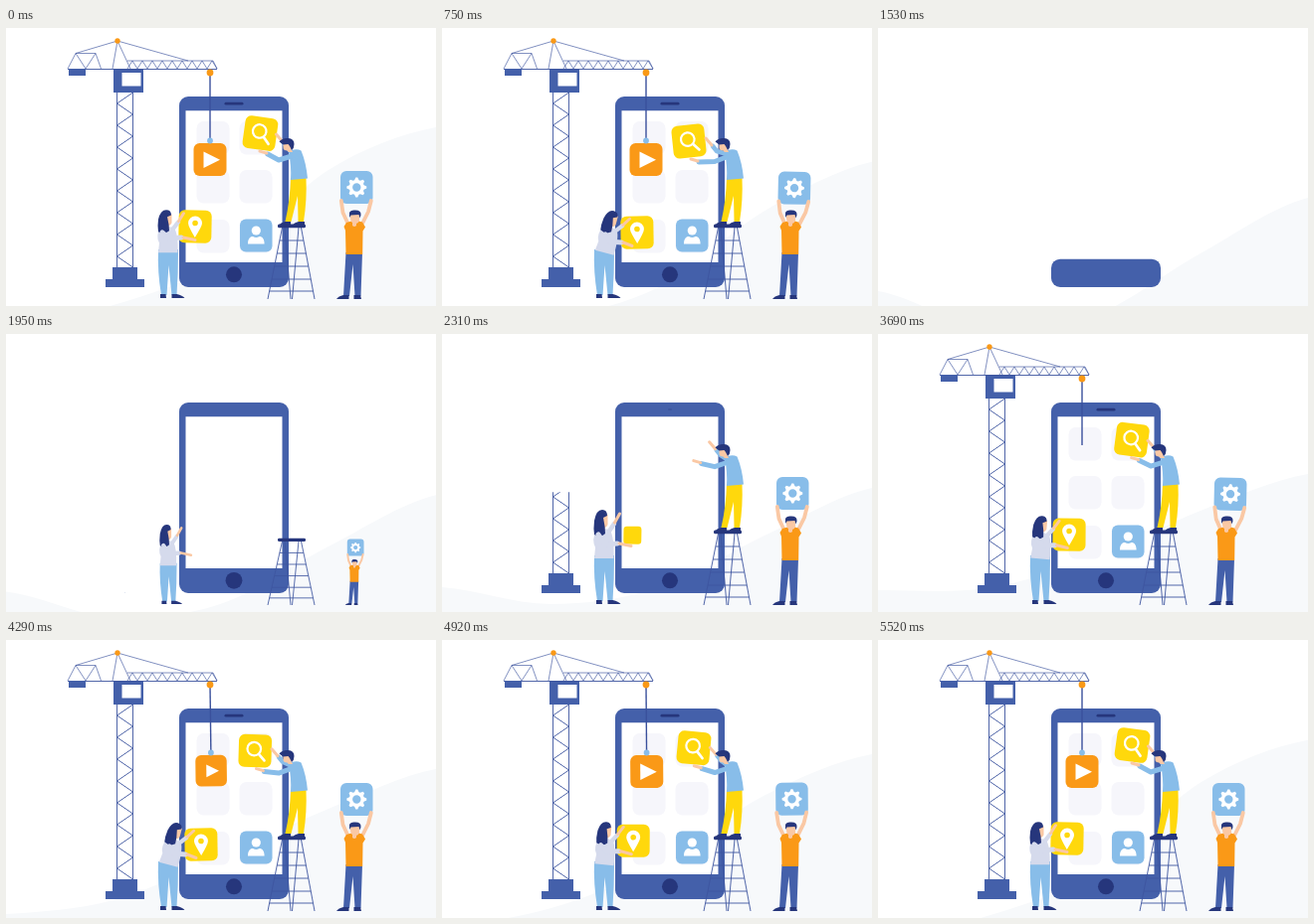
Recreate the animation shown at these times as an HTML page. Size 432x280 px, loop 5550 ms.

```html
<!DOCTYPE html>
<html lang="en">
<head>
<meta charset="utf-8">
<title>Building an app</title>
<style>
html, body { margin: 0; width: 100%; height: 100%; overflow: hidden; background: #fff; }
svg { display: block; width: 100vw; height: 100vh; }
.blue { fill: #4460aa; } .navy { fill: #26367c; } .sky { fill: #88bde9; }
.yellow { fill: #ffd80c; } .orange { fill: #fa9917; } .white { fill: #fff; }
.skin { fill: #fac8a4; } .pale { fill: #d5daec; } .slot { fill: #f6f6fb; }
.line { fill: none; stroke: #3e55a0; stroke-width: .9; stroke-linejoin: round; }
.thin { stroke-width: .65; }
.limb { fill: none; stroke-linecap: round; stroke-linejoin: round; }
</style>
</head>
<body>
<svg viewBox="0 0 432 280">
  <defs>
    <clipPath id="mastClip"><rect id="mastBox" x="105" width="30"/></clipPath>
    <clipPath id="jibClip"><rect id="jibBox" x="120" y="28" height="16"/></clipPath>
    <clipPath id="phoneClip"><rect id="phoneBox" x="174" width="110" rx="9"/></clipPath>
  </defs>
  <path id="wave" fill="#f7f9fb"/>
  <g id="stage">
    <g id="crane">
      <g id="base" class="blue"><path d="M100 253h39v8h-39zM107 241h25v12h-25z"/></g>
      <path id="mast" class="line" clip-path="url(#mastClip)"/>
      <g id="cab"><path class="blue" d="M108 41h30v24h-30z"/><path class="white" d="M116.500 45h19v13.500h-19z"/></g>
      <path id="jib" class="line thin" clip-path="url(#jibClip)"/>
      <path id="beam" class="line"/>
      <g class="line thin">
        <path class="draw" data-span="2640 3060" d="M95.500 41L90 25.500L80 41L70 25.500L62 41"/>
        <path class="draw" data-span="2760 3120" d="M90 25.500H70"/>
        <path class="draw" data-span="2880 3180" d="M107 41L112 13L125 41"/>
        <path class="draw" data-span="3000 3300" d="M112 13L70 25.500"/>
        <path class="draw" data-span="3000 3360" d="M112 13L183 33"/>
      </g>
      <path id="weight" class="blue" d="M63 41h17v7h-17z"/>
      <circle id="apex" class="orange" cx="112" cy="13" r="2.700"/>
    </g>

    <g clip-path="url(#phoneClip)">
      <path class="blue" d="M174 69h110v192h-110z"/>
      <path class="white" id="screen"/>
      <g id="slots" class="slot"></g>
      <circle id="home" class="navy" cx="229" cy="248.300" r="8"/>
      <rect id="speaker" class="navy" x="219.500" y="74.800" width="19" height="2.800" rx="1.400"/>
    </g>

    <g id="avatar">
      <rect class="sky" x="235" y="192.500" width="32.500" height="33" rx="6"/>
      <circle class="white" cx="251.300" cy="204" r="4.600"/>
      <path class="white" d="M243 217.500c0-5 2-7.500 5-7.500q3.300 2 6.600 0c3 0 5 2.500 5 7.500z"/>
    </g>

    <g id="hoist">
      <path id="rope" stroke="#3a509c" stroke-width="1.400"/>
      <g id="play">
        <rect class="orange" x="188.500" y="116" width="33" height="33" rx="6"/>
        <path id="arrow" class="white" d="M198.500 124.500v16.500l16.500-8.200z"/>
      </g>
      <circle id="hook" class="sky" cx="205" cy="113.500" r="2.900"/>
      <circle id="trolley" class="orange" cx="205" cy="45" r="3.400"/>
    </g>

    <g id="search">
      <rect class="yellow" x="-16.500" y="-16.500" width="33" height="33" rx="6"/>
      <g fill="none" stroke="#fff"><circle cx="-1" cy="-2" r="6.800" stroke-width="2.200"/><path d="M4 3.500L9.500 9.500" stroke-width="2.700" stroke-linecap="round"/></g>
    </g>

    <g id="ladder">
      <path class="line" id="rungs"/>
      <rect class="navy" x="273" y="197.500" width="28" height="3.800" rx="1.500"/>
    </g>
    <g id="climber">
      <path class="yellow" d="M286 151h15.500q1 22-2.500 44h-5.500l-.500-26-6.500 26h-6q5-22 5.500-44z"/>
      <path class="navy" d="M274.500 199q1-3 6-4h5.500v4zM288 199q1-3 6-4h6v4z"/>
      <path id="farArm" class="limb" stroke="#88bde9" stroke-width="4.500"/>
      <path id="farHand" class="limb" stroke="#fac8a4" stroke-width="3"/>
      <path class="sky" d="M284 124.500q7-4 12.500-1 5 12 6.500 28l-17 1.500q1-13-2-28.500z"/>
      <path id="nearArm" class="limb" stroke="#88bde9" stroke-width="5"/>
      <path id="nearHand" class="limb" stroke="#fac8a4" stroke-width="3"/>
      <path class="skin" d="M278.500 116h8v6l1.500 3h-4l-1.500-1.500q-4 0-4-3z"/>
      <path class="navy" d="M274.500 114.500q3-4 9-3.500 6 .500 6 6 0 4-2.500 6l-2-4-1.500-2-5 .500z"/>
    </g>

    <g id="woman">
      <path class="sky" d="M153 223h20q0 24-1.500 46h-5l-3-30-2 30h-5.500q-4-24-3-46z"/>
      <path class="navy" d="M155 272v-4h5.500l.500 4zM166.500 272v-4h5q6 1.500 8 4z"/>
      <g id="pin">
        <rect class="yellow" x="-16.500" y="-16.500" width="33" height="33" rx="6"/>
        <g id="marker"><path class="white" d="M0 11Q-7-.500-7-3.500a7 7 0 0 1 14 0Q7-.500 0 11z"/><circle class="yellow" cy="-3.500" r="2.800"/></g>
      </g>
      <g id="torso">
        <path class="limb" stroke="#d5daec" stroke-width="4.500" d="M167 200L173 191"/>
        <path class="limb" stroke="#fac8a4" stroke-width="3" d="M173.500 190L178.500 181"/>
        <path class="pale" d="M155 198q8-4 14 0 4 6 3.500 28h-19.500l1-11q-4-8 1-17z"/>
        <path class="skin" d="M160 182h6.500v10q-1 3-3 3v4h-5z"/>
        <path class="navy" d="M153 202q-1-6 0-14 2-11 8-11 5 0 5 6l-4 2q2 9 2 16-5 5-11 1z"/>
      </g>
      <path id="lowArm" class="limb" stroke="#d5daec" stroke-width="5"/>
      <path id="lowHand" class="limb" stroke="#fac8a4" stroke-width="3"/>
    </g>

    <g id="holder">
      <path class="blue" d="M341.500 226h16.500l-1.500 44h-6l-2-32-3.500 32h-6z"/>
      <path class="navy" d="M332 273q2-3 7-4h5.500v4zM349.500 273v-4h6.500l1 4z"/>
      <g id="lift">
        <g id="gear">
          <rect class="sky" x="336" y="144" width="32.500" height="33" rx="6"/>
          <path id="cog" class="white" fill-rule="evenodd"/>
        </g>
        <path class="limb" stroke="#fac8a4" stroke-width="3.800" d="M344 198L338.500 186L336.800 174M357.500 198L364 185L366.800 174"/>
      </g>
      <path class="orange" d="M342 196q8-3 16-.500l3 5-2.500 4-.300 23.500h-16.700l-.500-24-1.500-4z"/>
      <path class="skin" d="M346 187h9v7q-1 3-3 3v2q-2 2-4 0v-3q-2-1-2-4z"/>
      <path class="navy" d="M345 191v-5q1-3 6-2.500 6 0 5.500 5l-1 3-1-3.500-8 .500z"/>
    </g>
  </g>
</svg>
<script>
const LOOP = 5550, CUT = 1380;
const $ = id => document.getElementById(id);
const set = (id, attrs) => { for (const k in attrs) $(id).setAttribute(k, attrs[k]); };
const clamp = x => Math.max(0, Math.min(1, x));
const ramp = (t, a, b) => clamp((t - a) / (b - a));
const mix = (a, b, p) => a + (b - a) * p;
const smooth = p => p * p * (3 - 2 * p);
const out = p => 1 - (1 - p) ** 2;
const inOut = p => p < .5 ? 2 * p ** 2 : 1 - 2 * (1 - p) ** 2;
const back = p => 1 + 2.2 * (p - 1) ** 3 + 1.2 * (p - 1) ** 2;

function track(t, keys) {
  let i = 0;
  while (i < keys.length - 2 && t > keys[i + 1][0]) i++;
  const [a, va] = keys[i], [b, vb] = keys[i + 1];
  return mix(va, vb, smooth(ramp(t, a, b)));
}

function scaleAt(el, x, y, sx, sy = sx) {
  el.setAttribute('transform', `translate(${x} ${y}) scale(${sx} ${sy}) translate(${-x} ${-y})`);
  el.style.display = sx > 0 && sy > 0 ? '' : 'none';
}
const pop = (id, t, start, dur, x, y, ease = back) => scaleAt($(id), x, y, ease(ramp(t, start, start + dur)));

// Static geometry
const polyline = (steps, point) => 'M' + Array.from({ length: steps + 1 }, (_, i) => point(i).join(' ')).join('L');
set('mast', { d: 'M111.500 241V65M127.500 241V65' + polyline(16, i => [i % 2 ? 111.5 : 127.5, 241 - 11 * i]) });
set('jib', { d: polyline(18, i => [122 + 5 * i, i % 2 ? 33 : 41]) + 'M122 33H208L212 41' });
let rungs = 'M277.500 201L263 273M296.500 201L310 273M280 201L286 273M294 201L287.500 273';
for (const y of [214, 227, 240, 253, 265]) {
  const p = (y - 201) / 72;
  rungs += `M${277.5 - 14.5 * p} ${y}H${296.5 + 13.5 * p}`;
}
set('rungs', { d: rungs });

const cog = polyline(31, i => {
  const a = (i - 1.5) * Math.PI / 16, r = i % 4 === 1 || i % 4 === 2 ? 10 : 7.6;
  return [352.3 + r * Math.cos(a), 160.5 + r * Math.sin(a)];
});
set('cog', { d: cog + 'zM348.100 160.500a4.200 4.200 0 1 0 8.400 0a4.200 4.200 0 1 0-8.400 0z' });

const slots = [[191.5, 94, 2480], [191.5, 143, 2560], [191.5, 193, 2600], [234.5, 94, 2660], [234.5, 143, 2740], [234.5, 193, 2640]]
  .map(([x, y, start]) => {
    const el = document.createElementNS('http://www.w3.org/2000/svg', 'rect');
    for (const [k, v] of Object.entries({ x, y, width: 33, height: 33.5, rx: 7 })) el.setAttribute(k, v);
    $('slots').append(el);
    return { el, x: x + 16.5, y: y + 16.7, start };
  });

const strokes = [...document.querySelectorAll('.draw')].map(el => {
  const length = el.getTotalLength(), [from, to] = el.dataset.span.split(' ').map(Number);
  el.setAttribute('stroke-dasharray', `${length} ${length + 2}`);
  return { el, length, from, to };
});

// Heights of the backdrop curve at five evenly spaced points
const waves = [
  [1530, 265, 302, 290, 227, 171],
  [2310, 255, 272, 256, 203, 155],
  [2850, 247, 256, 238, 190, 147],
  [3690, 258, 256, 226, 178, 141],
  [4290, 276, 262, 218, 170, 130],
  [5550, 300, 279, 235, 143, 100],
  [7080, 265, 302, 290, 227, 171]
];

function drawWave(t) {
  const u = t < 1530 ? t + LOOP : t;
  const last = Math.max(1, waves.findIndex(w => w[0] >= u));
  const [a, ...from] = waves[last - 1], [b, ...to] = waves[last];
  const y = from.map((v, i) => mix(v, to[i], ramp(u, a, b)));
  let d = `M0 280V${y[0]}`;
  for (let i = 0; i < 4; i++) {
    const before = y[Math.max(0, i - 1)], after = y[Math.min(4, i + 2)], x = i * 108;
    d += `C${x + 36} ${y[i] + (y[i + 1] - before) / 6} ${x + 72} ${y[i + 1] - (after - y[i]) / 6} ${x + 108} ${y[i + 1]}`;
  }
  set('wave', { d: d + 'V280z' });
}

function drawPhone(t) {
  const h = mix(10, 192, inOut(ramp(t, 1410, 1950)));
  set('phoneBox', { y: 261 - h, height: h });
  const top = Math.min(236, 275.2 - h);
  set('screen', { d: `M180.500 ${top}H277.500V236H180.500z` });
  pop('home', t, 1800, 240, 229, 248.3);
  pop('speaker', t, 2290, 200, 229, 76, out);
  for (const s of slots) scaleAt(s.el, s.x, s.y, out(ramp(t, s.start, s.start + 240)));
  pop('avatar', t, 2400, 270, 251, 209);
}

function drawCrane(t) {
  pop('base', t, 1950, 240, 119.5, 261);
  const mast = 176 * ramp(t, 2130, 2520);
  set('mastBox', { y: 241 - mast, height: mast });
  pop('cab', t, 2480, 210, 119, 65, out);
  const grow = out(ramp(t, 2560, 3060));
  set('jibBox', { width: 93 * grow });
  const left = mix(120, 62, out(ramp(t, 2560, 2820)));
  set('beam', { d: t > 2560 ? `M${left} 41.500H${mix(120, 212, grow)}` : '' });
  for (const s of strokes) {
    const p = ramp(t, s.from, s.to);
    s.el.setAttribute('stroke-dashoffset', s.length * (1 - p));
    s.el.style.display = p ? '' : 'none';
  }
  scaleAt($('weight'), 71, 41, 1, out(ramp(t, 2940, 3150)));
  pop('apex', t, 3240, 300, 112, 13);

  pop('trolley', t, 3210, 240, 205, 45);
  const rope = smooth(ramp(t, 3390, 3660));
  set('rope', { d: rope ? `M205 47V${mix(47, 112, rope)}` : '' });
  pop('hook', t, 3720, 210, 205, 113.5);
  pop('play', t, 3870, 540, 205, 116, out);
  pop('arrow', t, 4020, 480, 206, 132.7, out);
  const swing = track(t, [[3900, 0], [4170, -1.2], [4560, .8], [4890, -.5], [5130, 0], [5160, 0]]);
  set('hoist', { transform: `rotate(${swing} 205 45)` });
}

function drawClimber(t) {
  scaleAt($('ladder'), 286, 273, 1, out(ramp(t, 1770, 2040)));
  pop('climber', t, 1950, 270, 288, 199, out);
  const s = track(t, [[2200, .6], [2850, 0], [3510, 1], [3720, .92], [4560, .1], [5250, 1.15], [5520, 1], [6090, 0], [6100, 0]]);
  const size = back(ramp(t, 2400, 2670));
  set('search', { transform: `translate(${mix(248, 255.500, s)} ${mix(114, 106, s)}) rotate(${mix(-6, 8, Math.sqrt(s))}) scale(${size})` });
  $('search').style.display = size > 0 ? '' : 'none';
  const ux = mix(265, 271.5, s), uy = mix(111, 107, s);
  const lx = mix(250, 255, s), ly = mix(132, 124, s);
  set('farArm', { d: `M289 128L${ux + 11} ${uy + 13}L${ux + 7} ${uy + 8}` });
  set('farHand', { d: `M${ux + 6} ${uy + 7}L${ux} ${uy}` });
  set('nearArm', { d: `M292 127.500L274 ${mix(134.500, 133, s)}L${lx + 8} ${ly + 3}` });
  set('nearHand', { d: `M${lx + 7} ${ly + 2}L${lx} ${ly}` });
}

function drawWoman(t) {
  pop('woman', t, 1770, 300, 164, 272, out);
  const lean = track(t, [[3300, 0], [4290, 1], [4530, 1], [5190, 0], [5670, 0], [6270, 1], [6450, 1], [6930, 0]]);
  const stoop = smooth(ramp(t, 2310, 2790));
  set('torso', { transform: `rotate(${15 * lean} 163 228) translate(0 ${27.400 * stoop}) scale(1 ${1 - .12 * stoop})` });
  const grow = out(ramp(t, 2220, 2500));
  const x = 190 + 6 * lean, y = 200 + 6 * lean;
  set('pin', { transform: `translate(${x + 3 * (1 - grow)} ${y + 6 * (1 - grow)}) rotate(${mix(1, -1, lean)}) scale(${grow})` });
  $('pin').style.display = grow ? '' : 'none';
  pop('marker', t, 2430, 240, 0, 5);
  const shoulder = 202 + 4 * stoop + 2 * lean;
  set('lowArm', { d: `M${157 + 7 * lean} ${shoulder}L${164 + 5 * lean} ${212 + 3 * lean}L${176 + 4 * lean} ${211 + 5 * lean}` });
  set('lowHand', { d: `M${178 + 4 * lean} ${211 + 5 * lean}L${190 + lean} ${213.500 + 6 * lean}` });
}

function drawHolder(t) {
  pop('holder', t, 1860, 300, 350, 273, out);
  const sway = track(t, [[3000, 0], [3570, 1], [3990, 0], [4680, 0], [4860, -.4], [5130, 0], [5580, 0], [6150, 1], [6660, 0]]);
  set('lift', { transform: `translate(${1.2 * sway} ${.8 * sway}) rotate(${1.5 * sway} 351 198)` });
}

function render(time) {
  const t = time % LOOP;
  drawWave(t);
  $('stage').style.display = t >= CUT && t < 1425 ? 'none' : '';
  // Before the cut the finished scene carries on past the end of the loop.
  const u = t < CUT ? t + LOOP : t;
  for (const draw of [drawPhone, drawCrane, drawClimber, drawWoman, drawHolder]) draw(u);
}

const began = performance.now();
function tick() {
  render(performance.now() - began);
  requestAnimationFrame(tick);
}
tick();
</script>
</body>
</html>
```
